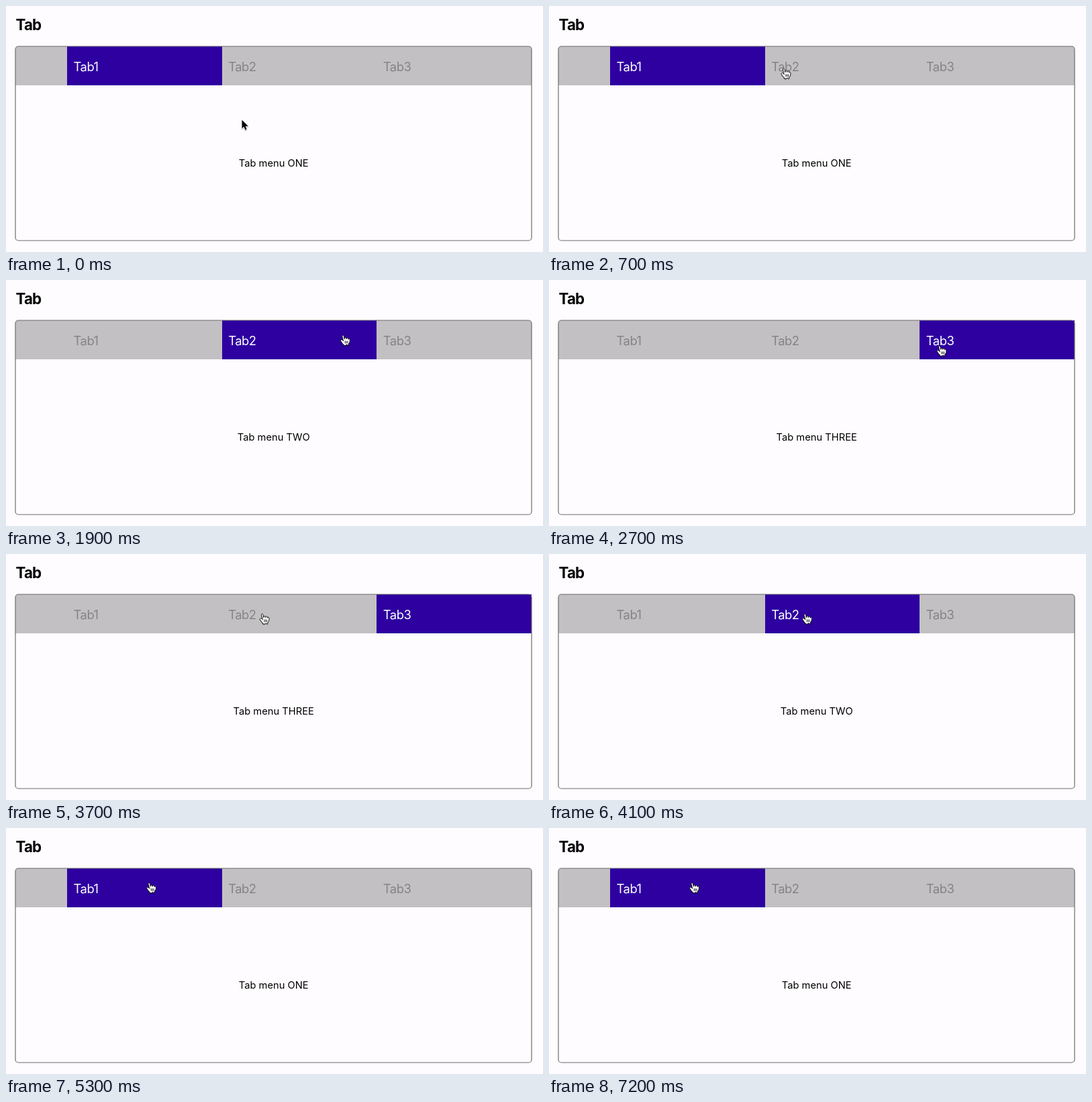
Write an HTML page that moves like this. It is 800 px wide and 366 px high and loops after 7300 ms.

```html
<!DOCTYPE html>
<html lang="en">
<head>
<meta charset="utf-8">
<title>Tab</title>
<style>
  html, body { margin: 0; width: 100%; height: 100%; overflow: hidden; background: #fefcfe; }
  svg { display: block; width: 800px; height: 366px; font-family: Inter, "Liberation Sans", sans-serif; }
  .title { font-size: 22.3px; font-weight: 700; letter-spacing: -.8px; }
  .bar { fill: #c2c0c2; }
  .tab rect { fill: none; }
  .tab text { font-size: 18.4px; letter-spacing: -.5px; fill: #858385; }
  .tab.on rect { fill: #2e00a0; }
  .tab.on text { fill: #fff; }
  .panel { font-size: 14.7px; text-anchor: middle; }
  .frame { fill: none; stroke: #6e6c6e; stroke-width: 1.2; }
  .cursor { filter: drop-shadow(0 1px .8px rgba(0, 0, 0, .35)); }
  .hand { fill: #fff; stroke: #000; stroke-width: .9; stroke-linejoin: round; stroke-linecap: round; }
  .arrow { fill: #000; stroke: #fff; stroke-width: 1.6; paint-order: stroke; stroke-linejoin: round; }
</style>
</head>
<body>
<svg viewBox="0 0 800 366">
  <text class="title" x="14.5" y="36">Tab</text>
  <path class="bar" d="M14 118V65Q14 60 19 60H778Q783 60 783 65V118Z"/>
  <g id="tabs"></g>
  <text class="panel" id="panel" x="398.7" y="239"></text>
  <rect class="frame" x="14" y="60" width="769" height="289" rx="4.5"/>
  <g class="cursor" id="cursor">
    <path class="arrow" id="arrow" d="M0 0V13.6L3.1 10.7L5.2 15.6L7.6 14.6L5.5 9.8H9.8Z"/>
    <g class="hand" id="hand">
      <path d="M-.7 13L-3.4 9Q-4 7.8 -2.9 7.2Q-2 6.7 -.7 7.6L.8 9.3L-1 2.2Q-1.5 .1 -.2 -.1Q1 -.1 1.5 1.5L2.5 6Q2.3 3.9 3.4 3.7Q4.9 3.4 5.3 4.8L5.5 6Q5.6 4.3 6.5 4.2Q8 3.9 8.4 5L8.7 6.6Q8.9 5.4 9.8 5.4Q11 5.5 11 6.7V9.2Q10.8 11 10 12.1Q8.7 13.4 8.7 14.3V15.9Q7.2 16.2 6.5 15Q6 14.3 5.4 15Q4.9 16 4.2 16H1.2Q1.4 14.8 .7 14.2Z"/>
      <path d="M3.5 9.4V12.6M5.5 9.4V12.6M7.5 9.4V12.6"/>
    </g>
  </g>
</svg>
<script>
const LOOP = 7300, TICK = 100, BAR_BOTTOM = 118;
const panels = ["ONE", "TWO", "THREE"];
const clicks = [1100, 2600, 4100, 5200];

// Each glide eases the cursor to x, y; bend bows its path up or down.
const home = { x: 351.5, y: 169.5 };
const glides = [
  { from: 0, to: 700, x: 349.5, y: 93, bend: 0 },
  { from: 1600, to: 2600, x: 581.5, y: 98, bend: -16 },
  { from: 3100, to: 3800, x: 381, y: 89, bend: 0 },
  { from: 4400, to: 4900, x: 213, y: 81.5, bend: 11 }
];

const byId = id => document.getElementById(id);
const tabEdge = i => 91 + i * 230.6;
const easeOut = k => 1 - (1 - k) ** 3;

byId("tabs").innerHTML = panels.map((_, i) => {
  const left = Math.round(tabEdge(i)), width = Math.round(tabEdge(i + 1)) - left;
  return `<g class="tab"><rect x="${left}" y="60" width="${width}" height="58"/>` +
    `<text x="${tabEdge(i) + 9.6}" y="97">Tab${i + 1}</text></g>`;
}).join("");
const tabs = [...document.querySelectorAll(".tab")];

function cursorAt(t) {
  let { x, y } = home;
  for (const g of glides) {
    if (t <= g.from) break;
    const k = easeOut(Math.min(1, (t - g.from) / (g.to - g.from)));
    x += (g.x - x) * k;
    y += (g.y - y) * k + g.bend * Math.sin(Math.PI * k);
  }
  return { x, y };
}

// The selection walks from the first tab to the last and back.
function selectedAt(t) {
  const last = panels.length - 1;
  return last - Math.abs(last - clicks.filter(c => c <= t).length);
}

function draw(t) {
  const selected = selectedAt(t);
  tabs.forEach((tab, i) => tab.classList.toggle("on", i === selected));
  byId("panel").textContent = "Tab menu " + panels[selected];

  const { x, y } = cursorAt(t);
  const overTab = y < BAR_BOTTOM;
  byId("cursor").setAttribute("transform", `translate(${x} ${y}) scale(.94)`);
  byId("hand").style.display = overTab ? "" : "none";
  byId("arrow").style.display = overTab ? "none" : "";
}

const start = performance.now();
function loop() {
  const t = (performance.now() - start) % LOOP;
  draw(Math.floor(t / TICK) * TICK);
  requestAnimationFrame(loop);
}
loop();
</script>
</body>
</html>
```
